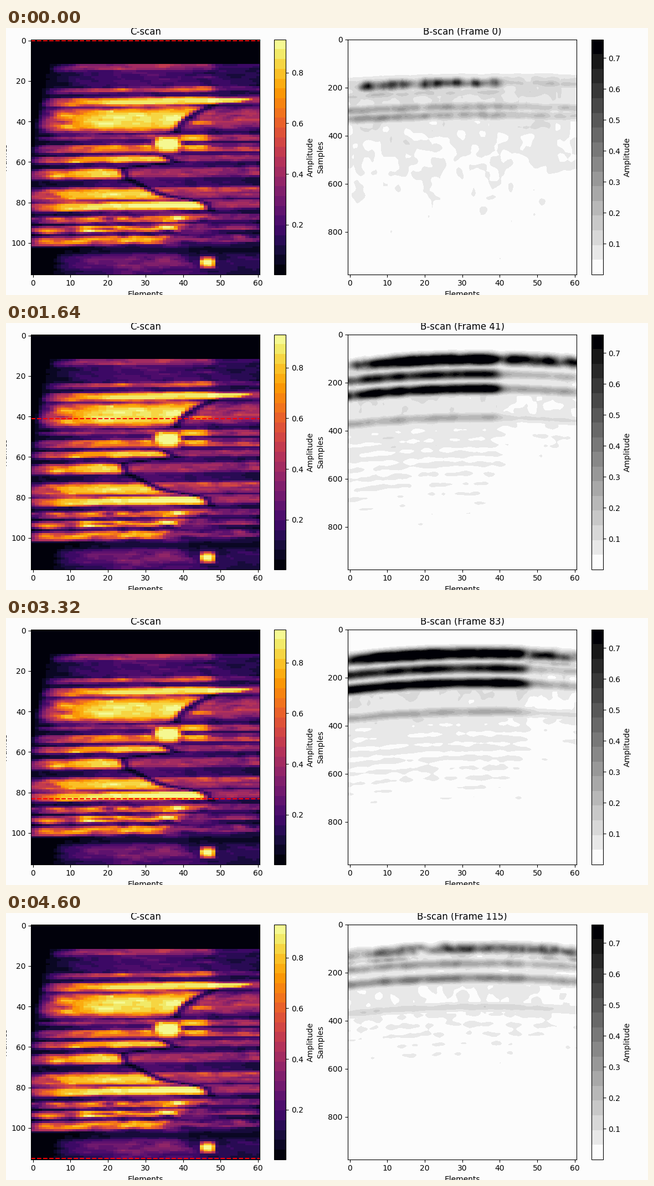
Recreate the animation shown at these times as a matplotlib script. Size 1159 px wide and 483 px high, loop 4640 ms.

```python
import numpy as np
import matplotlib.pyplot as plt
from matplotlib.animation import FuncAnimation
from matplotlib.colors import ListedColormap

W, H, DPI = 1159, 483, 100
FRAMES, ELEMENTS = 116, 61
GATE_OPEN = 12  # first scan whose echo falls inside the gate
PAPER = "#fcfcfc"

rng = np.random.default_rng(7)
rows = np.arange(FRAMES)[:, None]
cols = np.arange(ELEMENTS)
depth = np.arange(0, 980, 4)[:, None]


def smooth_noise(shape, sigmas):
    """Gaussian-filtered white noise with unit variance."""
    spec = np.fft.fftn(rng.standard_normal(shape))
    for axis, (n, sigma) in enumerate(zip(shape, sigmas)):
        dims = [1] * len(shape)
        dims[axis] = n
        spec = spec * np.exp(-2 * (np.pi * sigma * np.fft.fftfreq(n)) ** 2).reshape(dims)
    out = np.fft.ifftn(spec).real
    return out / out.std()


def gauss(x, sigma):
    return np.exp(-0.5 * (x / sigma) ** 2)


def plateau(x, half, p=4):
    return np.exp(-np.abs(x / half) ** p)


def step(x, soft=1.0):
    return 0.5 * (1 + np.tanh(x / (2 * soft)))


# Row, half height and peak of each strong echo down the part
ECHOES = [(13.2, 1.9, .42), (18.5, 2, .2), (24.6, 1.5, .52), (30.3, 2.4, .86),
          (39.2, 6.4, .89), (47.8, 1.3, .42), (53.3, 2.3, .66), (58.7, 1.9, .82),
          (65.7, 2.8, .86), (75.8, 3.4, .87), (81.8, 2.5, .91), (88.2, 1.8, .66),
          (93, 1.9, .68), (98.8, 2.4, .68), (109.5, 4.5, .32)]

# Row, element, half sizes and peak of single reflectors
SPOTS = [(51.3, 36, 4.6, 4, .95), (48, 43, 1.9, 5, .8), (53, 43, 2, 5, .7),
         (40.5, 45, 1.7, 4, .64), (88.5, 36.5, 1.5, 3, .76), (92.8, 36.5, 1.6, 3.5, .85),
         (109.5, 46.5, 3, 2.1, .88)]

# The flaw wanders across the elements from row to row
FLAW_ROWS = [12, 28, 29, 30, 31, 36, 40, 45, 46, 50, 56, 60, 63, 68, 76, 80, 85, 99, 115]
FLAW_COLS = [48, 48, 58, 56, 49, 43, 40, 38, 34, 31, 34, 38, 24, 25, 34, 46, 48, 34, 46]


def strength(r):
    return np.max([peak * plateau(r - at, half) for at, half, peak in ECHOES], axis=0)


def flaw(r):
    return np.interp(r, FLAW_ROWS, FLAW_COLS)


def make_cscan():
    lead = np.where(rows < 103, 5 - rows / 9, 5)
    rise = 1 - np.exp(-np.clip(cols - lead, 0, None) / 6)
    sound = .45 + .55 * step(flaw(rows) - cols, .5)
    img = strength(rows + .03 * (cols - 20)) * rise * sound

    floor = (.1 + .12 * gauss(cols - 30, 14)) * (.25 + .75 * rise)
    floor = floor * (1 - .5 * plateau(rows - 104, 2.5))
    img = np.maximum(img, floor)
    for r in (29.5, 48, 53.5, 73.5):  # echoes that carry on past the flaw
        img = np.maximum(img, .58 * plateau(rows - r, 1.5) * step(cols - flaw(r), .5)
                         * (1 - cols / 300))

    cracked = ((rows > 31) & (rows < 46)) | ((rows > 56) & (rows < 85))
    width = 1.2 + .35 * np.abs(np.gradient(flaw(rows[:, 0])))[:, None]
    img = img * (1 - .75 * cracked * np.exp(-((cols - flaw(rows)) / width) ** 2))
    for r, c, hr, hc, peak in SPOTS:
        img = np.maximum(img, peak * plateau(rows - r, hr) * plateau(cols - c, hc))

    mottle = np.where(img > .72, .03, .12) + .1 * plateau(rows - 93, 8)
    img = img * (1 + mottle * smooth_noise(img.shape, (.6, 1.3)))
    return np.clip(img, 0, .93) * (rows >= GATE_OPEN)


cscan = make_cscan()
speckle = smooth_noise((FRAMES, len(depth), ELEMENTS), (.7, 3.2, .75))
ripple = smooth_noise((FRAMES, ELEMENTS), (.7, .9))


def early_scan(k):
    """Late, weak echo before the probe reaches the gate."""
    n = speckle[k]
    d = depth - 179 - .013 * (cols - 38) ** 2
    covered = step(cols - 2.5, .3) * step(41 - cols, .4)
    hot = sum(gauss(cols - c, .8) for c in (4, 5.2, 11.5, 14, 20, 23, 28.5, 33.5, 38.5))
    main = (.15 + .26 * covered + .3 * hot) * (1 + .12 * ripple[k])
    lower = .18 + .09 * step(41 - cols, 2)

    echo = main * gauss(d, 15)
    for gap, sigma in ((38, 16), (99, 15), (133, 15)):
        echo = np.maximum(echo, lower * (.55 if gap < 50 else 1) * gauss(d - gap, sigma))
    below = np.clip(d, 0, None)
    haze = .11 * np.exp(-below / 380) * step(d + 38, 8)
    grit = .018 * np.exp(-below / 1500) * step(d + 25, 12)
    return np.maximum(echo * (1 + .15 * n), haze + grit * n)


def late_scan(k):
    """Front echo follows the C-scan row; deeper echoes stop at the flaw."""
    n = speckle[k]
    side = step(flaw(k) - cols, .8 if k > 31 else 2.5)
    level = .4 + .6 * (strength(k) / .89) ** 1.5
    body = .28 + (level - .28) * side
    padded = np.pad(cscan[k], 1, mode="edge")
    front = .2 + .9 * (padded[:-2] + 2 * padded[1:-1] + padded[2:]) / 4
    rough = .08 + .3 * np.clip(1 - front / .8, 0, 1)

    d = depth - 97 - 3 * np.cos(k / 5.4) - .024 * (cols - 35) ** 2
    echo = 1.22 * front * gauss(d - 3, 16) * (1 + rough * n)
    ring = .3 * np.clip(.75 - front, 0, None)
    echo = np.maximum(echo, ring * gauss(d - 35, 12) * (1 + .4 * n))
    for gap, gain in ((65, .74), (126, .97)):
        wave = gain * body * gauss(d - gap, 14.5)
        echo = np.maximum(echo, wave * (1 + .08 * ripple[k] + .3 * rough * n))
    echo = np.maximum(echo, .25 * body ** .7 * gauss(d - 246, 15) * (1 + .08 * n))

    below = np.clip(d, 0, None)
    decay = np.exp(-below / 450)
    stripes = 1 + .3 * np.cos(2 * np.pi * (d - 358) / 41) * step(d - 270, 20)
    haze = .13 * decay * stripes * step(d + 25, 6) * (.42 + .58 * body)
    grit = .02 * decay * step(d - 5, 10)
    return np.maximum(echo, haze + grit * n)


def bscan(k):
    scan = early_scan if k < GATE_OPEN else late_scan
    return np.clip(scan(k), 0, 1)


fire = ListedColormap(plt.get_cmap("inferno")((np.arange(24) + .5) / 24))
greys = [(v / 255,) * 3 for v in [252, *range(232, 23, -16)]]
ink = ListedColormap(greys + [(0, 0, .025)])

fig = plt.figure(figsize=(W / DPI, H / DPI), dpi=DPI, facecolor=PAPER)


def axes(x0, x1, y0=20.8, y1=445.6):
    return fig.add_axes([x0 / W, 1 - y1 / H, (x1 - x0) / W, (y1 - y0) / H])


ax_c, bar_c = axes(45.3, 458.4), axes(484.2, 505.4)
ax_b, bar_b = axes(617.2, 1030.3), axes(1056.6, 1077.8)

im_c = ax_c.imshow(cscan, cmap=fire, vmin=.004, vmax=.931, aspect="auto",
                   interpolation="nearest")
im_b = ax_b.imshow(bscan(0), cmap=ink, vmin=.001, vmax=.76, aspect="auto",
                   extent=(-.5, 60.5, 977, 0), interpolation="bilinear",
                   interpolation_stage="data")
cursor = ax_c.axhline(0, color="red", ls="--", lw=1.5)

ax_c.set(title="C-scan", xlabel="Elements", ylabel="Frames")
ax_b.set(xlabel="Elements", ylabel="Samples")
title = ax_b.set_title("B-scan (Frame 0)")
for im, bar in ((im_c, bar_c), (im_b, bar_b)):
    fig.colorbar(im, cax=bar, label="Amplitude")


def update(k):
    cursor.set_ydata([k, k])
    im_b.set_data(bscan(k))
    title.set_text(f"B-scan (Frame {k})")
    return cursor, im_b, title


anim = FuncAnimation(fig, update, frames=FRAMES, interval=40, repeat=True, repeat_delay=0)
plt.show()
```
